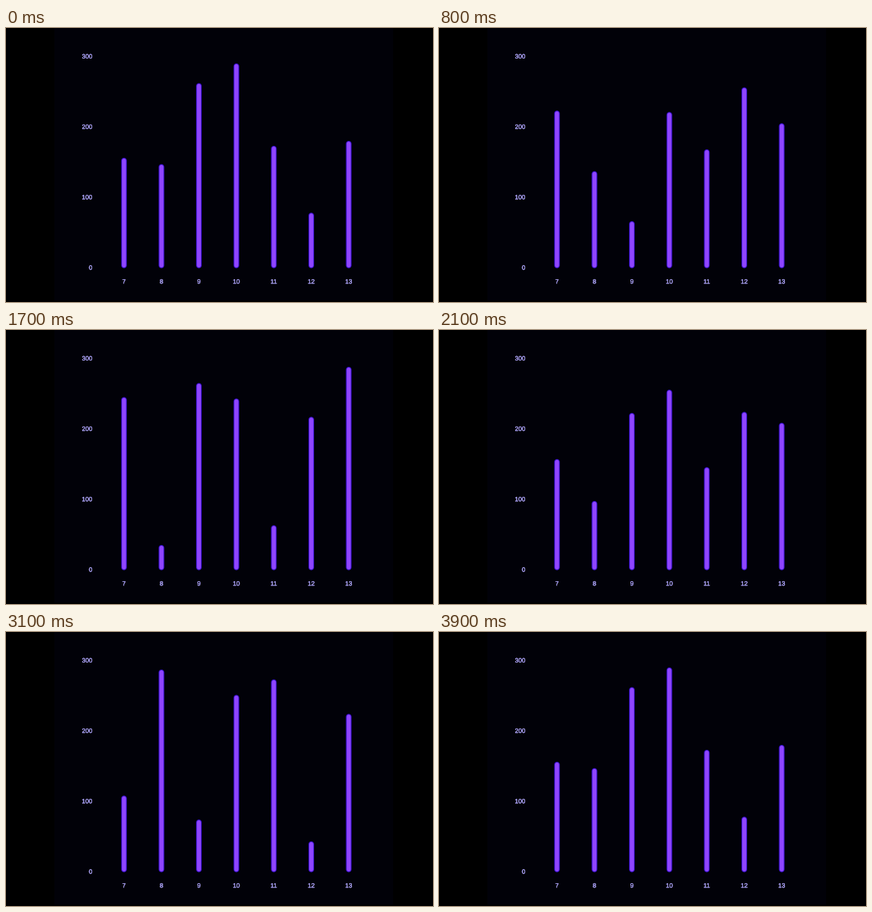
Recreate the animation shown at these times as a matplotlib script. Size 600 by 386 pixels, loop 4000 ms.

```python
import matplotlib.pyplot as plt
import numpy as np
from matplotlib.animation import FuncAnimation
from matplotlib.patches import Rectangle
from matplotlib.patheffects import withStroke

W, H, DPI = 600, 386, 100
STEP, LOOP = 100, 4000
PX = 72 / DPI  # points per pixel

BACK, PANEL = "#000000", "#010108"
CORE, EDGE, LABEL = "#8f45ff", "#3511c4", "#a9a0f2"

ZERO_Y, UNIT = 338, 0.992  # baseline and pixels per unit of value
DAYS = range(7, 14)
DAY_X, DAY_GAP = 165.8, 52.63

# Chart values reached at each key time in ms
KEYS = {
    0: [156, 147, 262, 290, 173, 78, 180],
    800: [223, 137, 66, 221, 168, 256, 205],
    1300: [132, 254, 117, 129, 261, 155, 247],
    1700: [245, 35, 265, 243, 63, 217, 288],
    2500: [69, 160, 180, 268, 228, 231, 129],
    3100: [108, 287, 74, 251, 273, 43, 224],
}
KEYS[3600] = KEYS[LOOP] = KEYS[0]
times = np.array(list(KEYS))
poses = np.array(list(KEYS.values()))


def values_at(ms):
    k = np.searchsorted(times, ms, side="right") - 1
    p = (ms - times[k]) / (times[k + 1] - times[k])
    eased = (1 - np.cos(np.pi * p)) / 2
    return poses[k] + (poses[k + 1] - poses[k]) * eased


def day_x(day):
    return DAY_X + DAY_GAP * (day - DAYS[0])


def value_y(value):
    return ZERO_Y - UNIT * value


fig = plt.figure(figsize=(W / DPI, H / DPI), dpi=DPI, facecolor=BACK)
ax = fig.add_axes([0, 0, 1, 1])
ax.set(xlim=(0, W), ylim=(H, 0))
ax.axis("off")
ax.add_patch(Rectangle((68, 0), 476, 384, color=PANEL, lw=0))


def label(x, y, text, align):
    ax.text(x, y, text, color=LABEL, size=8.8 * PX, family="Liberation Sans",
            ha=align, va="center",
            path_effects=[withStroke(linewidth=0.3 * PX, foreground=LABEL)])


class Bar:
    RADIUS = 3.5

    def __init__(self, x):
        self.lines = [self.stroke(x, 8, EDGE), self.stroke(x, 5.8, CORE)]

    def stroke(self, x, width, color):
        line, = ax.plot([x, x], [ZERO_Y, ZERO_Y], color=color, lw=width * PX,
                        solid_capstyle="round", snap=False)
        return line

    def set_value(self, value):
        for line in self.lines:
            line.set_ydata([value_y(value) + self.RADIUS, ZERO_Y - self.RADIUS])


for value in range(0, 301, 100):
    label(121.3, value_y(value), str(value), "right")
for day in DAYS:
    label(day_x(day), 357.6, str(day), "center")
bars = [Bar(day_x(day)) for day in DAYS]


def draw(i):
    for bar, value in zip(bars, values_at(i * STEP)):
        bar.set_value(value)
    return [line for bar in bars for line in bar.lines]


anim = FuncAnimation(fig, draw, frames=LOOP // STEP, interval=STEP,
                     repeat=True, repeat_delay=0, blit=False)
plt.show()
```
